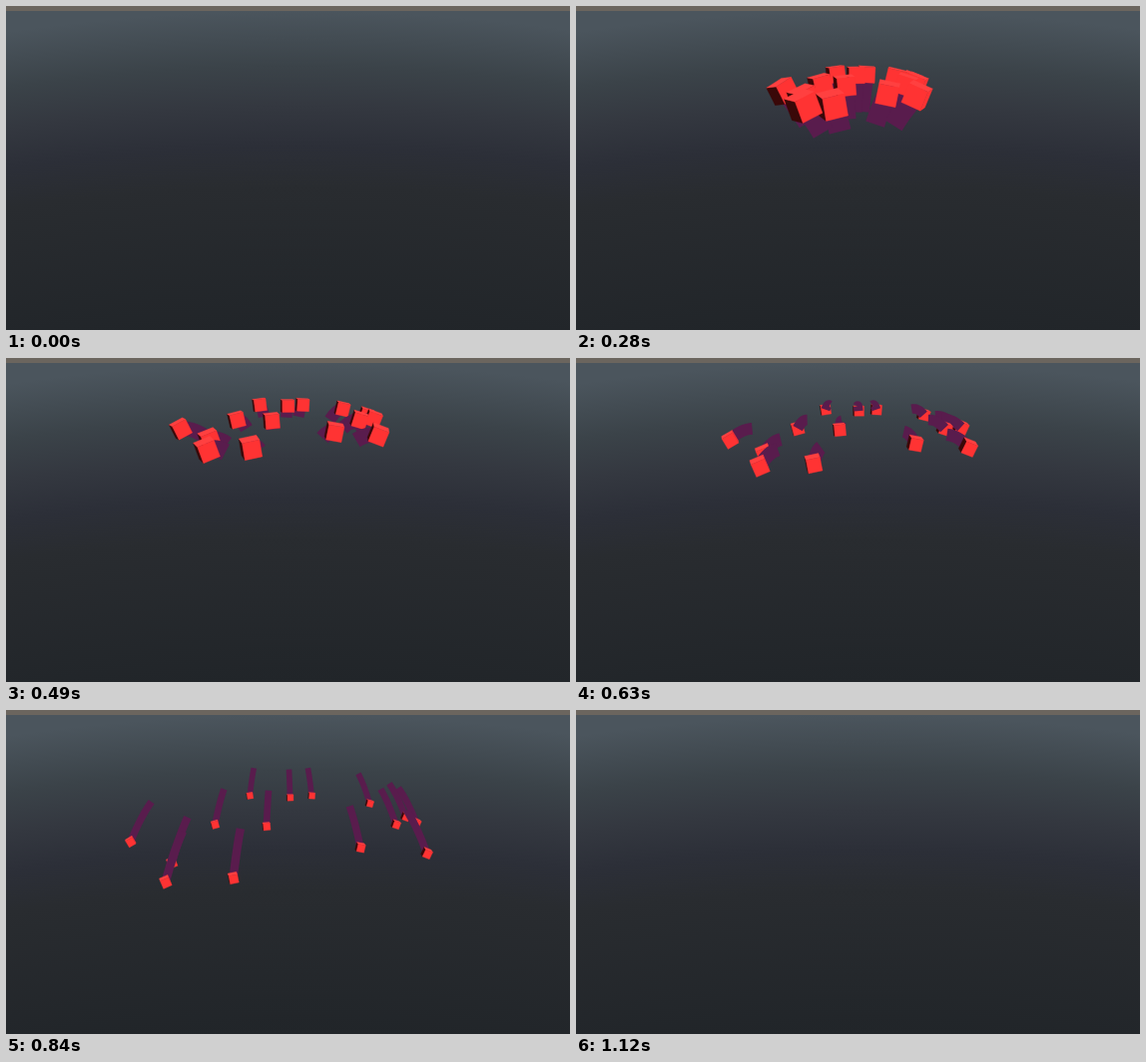
These frames come from a looping animation (565x325 px, 1600 ms). An HTML page:

```html
<!DOCTYPE html>
<html lang="en">
<head>
<meta charset="utf-8">
<title>Cube burst</title>
<style>
  html, body { margin: 0; width: 100%; height: 100%; overflow: hidden; background: #24282c; }
  svg { display: block; width: 565px; height: 325px; }
</style>
</head>
<body>
<svg viewBox="0 0 565 325">
  <defs>
    <radialGradient id="haze" gradientUnits="userSpaceOnUse" cx="290" cy="2000" r="2000">
    </radialGradient>
  </defs>
  <rect width="565" height="325" fill="url(#haze)"/>
  <rect width="565" height="5" fill="#6b655e"/>
  <g id="burst"></g>
</svg>
<script>
const LOOP = 1600, STEP = 70, END = 1120;
const BIRTH = 30, MID = 490, SPAN = 350, TRAIL = 150;
const CENTER = 283, BACK = 47;
const RED = '#ff3333', LIT = '#ff4040', DARK = '#3a0808', PURPLE = '#591c4d';

// Where each cube hangs at the top of its arc, from back to front.
const peaks = [
  [254, 47], [297, 47], [282, 48], [337, 51], [361, 58],
  [368, 61], [231, 62], [354, 62], [266, 63], [175, 71],
  [329, 74], [373, 77], [204, 82], [245, 90], [201, 92]
];

// Speed, drop and size all follow from how near the cube is.
const cubes = peaks.map(([x, y]) => {
  const near = y - BACK;
  const side = (x - CENTER) / 100;
  return {
    x, y, side,
    spread: 3 + side * (44 + near * 0.22),
    drift: near * 0.45 - 6,
    rise: 56 - near * 0.52,
    fall: 39 + near * 0.92,
    size: 12 + near * 0.14,
    pitch: 4 + near * 0.3,
    receding: near < 16,
    death: near > 33 ? 1010 : END
  };
});

const rad = deg => deg * Math.PI / 180;
const fmt = p => p[0].toFixed(2) + ',' + p[1].toFixed(2);
const phase = t => (t - MID) / SPAN;
const sizeAt = (c, t) => c.size * (1180 - t) / 690;

function position(c, t) {
  const u = phase(t);
  const curve = u < 0 ? c.rise + c.drift : c.fall - c.drift;
  return [c.x + c.spread * (1.05 * u - 0.05 * u * u), c.y + c.drift * u + curve * u * u];
}

function rotator(yaw, pitch, roll) {
  const [cy, sy, cp, sp, cr, sr] = [yaw, pitch, roll].flatMap(a => [Math.cos(rad(a)), Math.sin(rad(a))]);
  return ([x, y, z]) => {
    const x1 = x * cy + z * sy, z1 = z * cy - x * sy;
    const y1 = y * cp + z1 * sp, z2 = z1 * cp - y * sp;
    return [x1 * cr - y1 * sr, x1 * sr + y1 * cr, z2];
  };
}

function faceColor([x, y, z]) {
  if (0.45 * x - 0.4 * y + 0.8 * z < 0.08) return DARK;
  return y < -0.6 ? LIT : RED;
}

function drawCube(c, t) {
  const u = Math.min(phase(t), 0.4);
  const half = sizeAt(c, t) / 2;
  const [px, py] = position(c, t);
  const turn = rotator(8 + 30 * u * c.side, c.pitch, c.side * (25 + 10 * Math.max(0, u)));
  let out = '';
  for (let axis = 0; axis < 3; axis++) {
    for (const sign of [-1, 1]) {
      const point = (a, b) => {
        const v = [];
        v[axis] = sign;
        v[(axis + 1) % 3] = a;
        v[(axis + 2) % 3] = b;
        return turn(v);
      };
      const normal = point(0, 0);
      if (normal[2] <= 0) continue;
      const corners = [[-1, -1], [1, -1], [1, 1], [-1, 1]].map(([a, b]) => {
        const [x, y] = point(a, b);
        return fmt([px + x * half, py + y * half]);
      });
      const color = faceColor(normal);
      out += `<polygon points="${corners.join(' ')}" fill="${color}" stroke="${color}" stroke-width=".3"/>`;
    }
  }
  return out;
}

function drawTrail(c, t) {
  const from = Math.max(BIRTH, t - TRAIL);
  const points = [];
  for (let i = 0; i <= 8; i++) points.push(fmt(position(c, from + (t - from) * i / 8)));
  return `<polyline points="${points.join(' ')}" fill="none" stroke="${PURPLE}"
    stroke-width="${(sizeAt(c, t) * 0.95).toFixed(2)}" stroke-linejoin="round"/>`;
}

function scene(t) {
  if (t < STEP || t >= END) return '';
  const alive = cubes.filter(c => t < c.death);
  const trails = alive.map(c => drawTrail(c, t));
  const bodies = alive.map(c => drawCube(c, t));
  if (t < MID - STEP) return trails.join('') + bodies.join('');
  // Receding cubes start their fall behind their own trail.
  const turning = t > 560 && t < 720;
  return alive.map((c, i) => c.receding && turning
    ? bodies[i] + trails[i]
    : trails[i] + bodies[i]).join('');
}

document.getElementById('haze').innerHTML = [
  [325, '#212529'], [180, '#292c30'], [140, '#2c2f38'],
  [100, '#343840'], [60, '#3b4349'], [5, '#4b555d']
].map(([y, color]) => `<stop offset="${1 - y / 2000}" stop-color="${color}"/>`).join('');

const burst = document.getElementById('burst');
const start = performance.now();
let shown = -1;

function render(now) {
  const elapsed = Math.max(0, now - start) % LOOP;
  const t = Math.floor(elapsed / STEP) * STEP;
  if (t !== shown) {
    burst.innerHTML = scene(t);
    shown = t;
  }
  requestAnimationFrame(render);
}
render(start);
</script>
</body>
</html>
```
